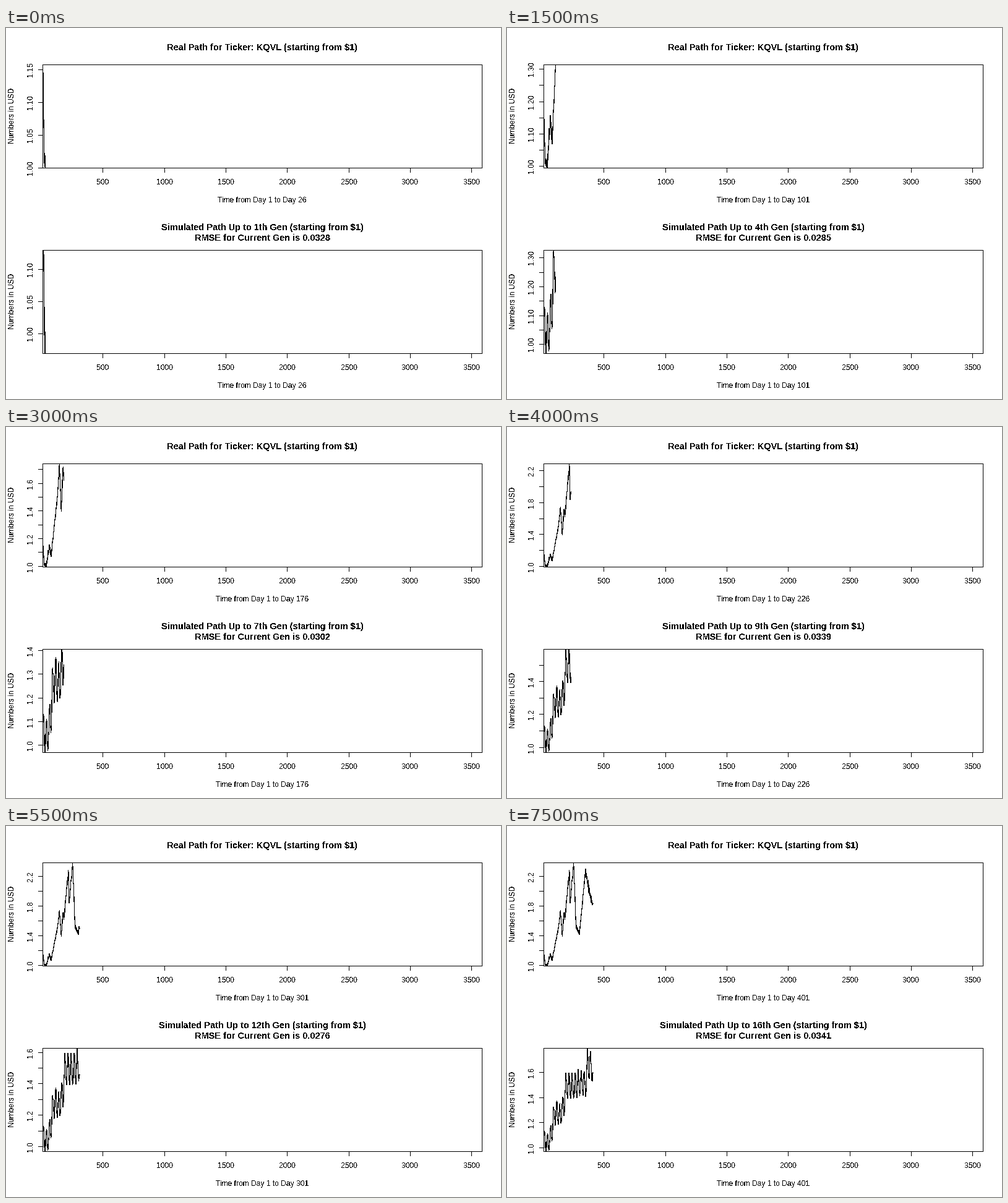
Animation of 800 by 600 pixels, one loop 8 s. Source, as a matplotlib script:

```python
import math

import matplotlib.pyplot as plt
import numpy as np
from matplotlib.animation import FuncAnimation
from matplotlib.patches import Rectangle

W, H, DPI = 800, 600, 100
LEFT, RIGHT, TALL = 59.5, 769.5, 167
DAYS, CYCLE, FRAMES = 401, 25, 16
TICKER = "KQVL"

plt.rcParams.update({
    "font.family": "Liberation Sans",
    "text.antialiased": False,
    "lines.antialiased": False,
    "patch.antialiased": False,
    "path.snap": False,
})

# Main turns of the market as (day, value)
TURNS = [(6, 1.158), (16, 1.01), (30, .994), (58, 1.143), (71, 1.076),
         (124, 1.514), (140, 1.741), (155, 1.395), (170, 1.72), (175, 1.62),
         (212, 2.285), (219, 1.84), (247, 2.383), (266, 1.53), (295, 1.42),
         (342, 2.27), (400, 1.83)]
# Lower envelope of the simulation as (day, value)
FLOOR = [(0, 1), (25, .9645), (45, .975), (70, 1.045), (83, 1.155),
         (108, 1.2), (133, 1.175), (170, 1.25), (183, 1.394), (270, 1.394),
         (284, 1.42), (345, 1.4), (359, 1.567), (400, 1.53)]
RMSE = [.0328, .0261, .0229, .0285, .0305, .0317, .0302, .0294,
        .0339, .0312, .0296, .0276, .0253, .0318, .0287, .0341]


def x_px(v):
    return 156.9 + .1986 * (v - 500)


def mid(v):
    """Centre of the pixel that holds v."""
    return np.floor(v) + .5


def real_path(rng):
    """Daily noise around the turns, never beyond the extremes so far."""
    turn_days, values = zip(*TURNS)
    base = np.interp(days, turn_days, values)
    noise = rng.normal(0, .012, DAYS)
    noise[list(turn_days)] = 0
    return np.clip(base * (1 + noise),
                   np.minimum.accumulate(base), np.maximum.accumulate(base))


def sim_path(rng):
    """A noisy wave, one per generation, on top of the floor."""
    phase = (days - 9) % CYCLE
    turn = np.interp(phase, [0, 13, CYCLE], [0, math.pi, 2 * math.pi])
    wave = .5 + .5 * np.cos(turn)
    noise = rng.normal(0, .1, DAYS)
    noise[phase == 0] = 0
    return np.interp(days, *zip(*FLOOR)) * (1 + .145 * np.clip(wave + noise, 0, 1))


def tick_step(lo, hi):
    cell = (hi - lo) / 5
    base = 10 ** math.floor(math.log10(cell))
    step = base
    for mult, bias in ((2, .8), (5, 1.7), (10, .8)):
        if mult * base - cell >= bias * (cell - step):
            break
        step = mult * base
    return step


days = np.arange(DAYS)
days_x = mid(x_px(days + 5))
real = real_path(np.random.default_rng(4))
sim = sim_path(np.random.default_rng(9))

fig = plt.figure(figsize=(W / DPI, H / DPI), dpi=DPI, facecolor="white")
ax = fig.add_axes([0, 0, 1, 1])


def text(x, y, s, size=12, **kw):
    ax.text(x, y, s, size=size * 72 / DPI, ha="center", va="baseline",
            rotation_mode="anchor", parse_math=False, **kw)


def title(y, s):
    text(414.5, y, s, 14.5, weight="bold")


def line(xs, ys):
    return ax.plot(xs, ys, color="black", lw=72 / DPI)[0]


def panel(top, path, n):
    bottom = top + TALL
    lo, hi = path[:n].min(), path[:n].max()

    def y_px(v):
        return mid(bottom - (v - lo) / (hi - lo) * TALL)

    frame = ax.add_patch(Rectangle((LEFT, top), RIGHT - LEFT, TALL,
                                   fill=False, lw=72 / DPI))
    line(days_x[:n], y_px(path[:n])).set_clip_path(frame)

    for v in range(500, 3501, 500):
        x = mid(x_px(v))
        line([x, x], [bottom, bottom + 7])
        text(x, bottom + 26.5, str(v))

    step = tick_step(lo, hi)
    skip = 2 if step / (hi - lo) * TALL < 28 else 1
    digits = 2 if step < .09 else 1
    first = math.ceil(lo / step - 1e-6)
    last = math.floor(hi / step + 1e-6)
    for i in range(first, last + 1):
        y = y_px(i * step)
        line([LEFT - 7, LEFT], [y, y])
        if (i - first) % skip == 0:
            text(43, y, f"{i * step:.{digits}f}", rotation=90)

    text(13, top + 82.5, "Numbers in USD", rotation=90)
    text(414, bottom + 55.5, f"Time from Day 1 to Day {n}")


def draw(k):
    ax.clear()
    ax.set(xlim=(0, W), ylim=(H, 0))
    ax.axis("off")
    n = 26 + CYCLE * k
    title(36, f"Real Path for Ticker: {TICKER} (starting from $1)")
    panel(59.5, real, n)
    title(327, f"Simulated Path Up to {k + 1}th Gen (starting from $1)")
    title(344, f"RMSE for Current Gen is {RMSE[k]:.4f}")
    panel(359.5, sim, n)
    return []


anim = FuncAnimation(fig, draw, frames=FRAMES, init_func=lambda: [],
                     interval=500, repeat=True, repeat_delay=0, blit=False)
plt.show()
```
